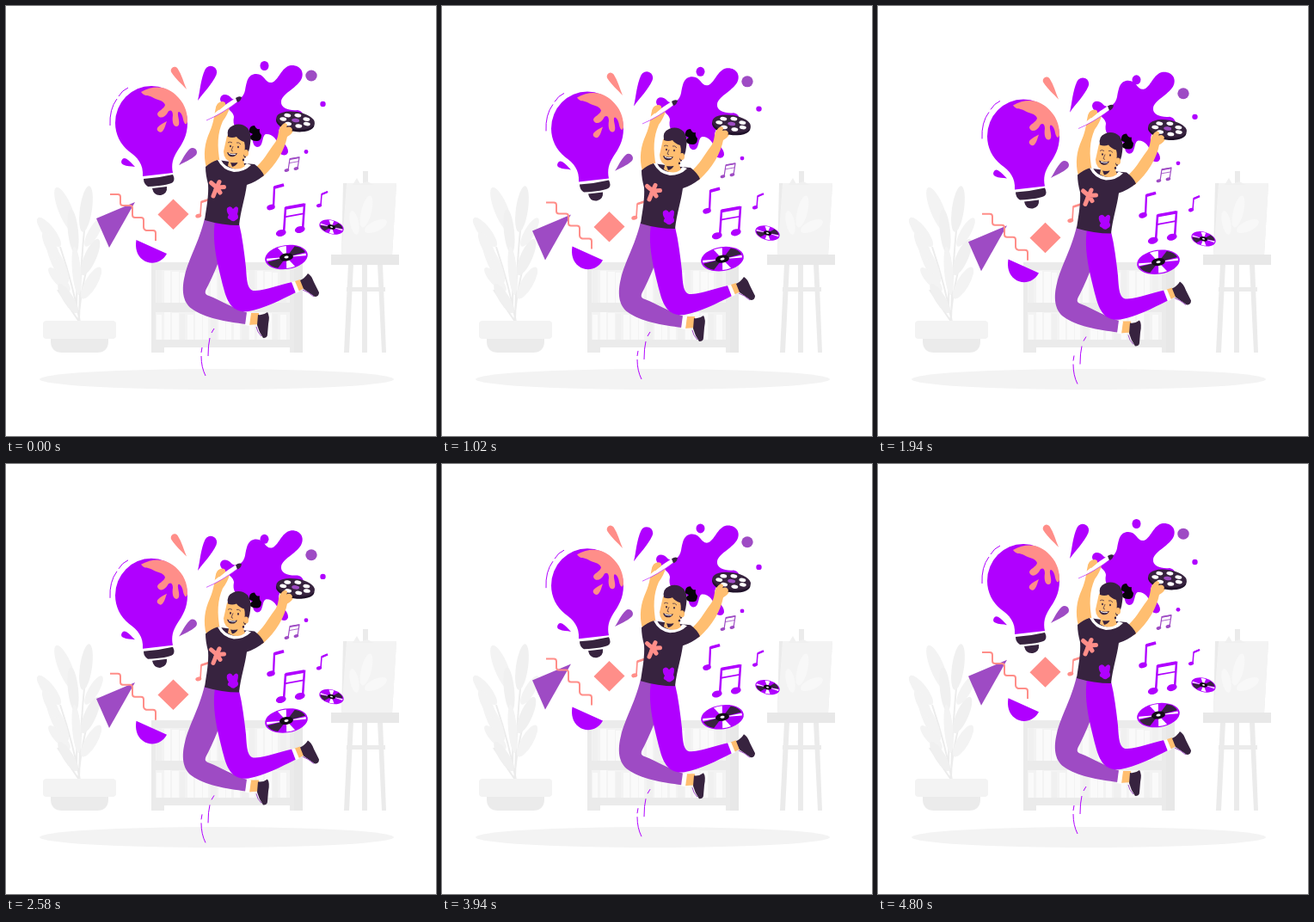
Write an HTML page with a canvas that moves like this. It is 500 by 500 pixels and loops after 4.84 s.

```html
<!DOCTYPE html>
<html lang="en">
<head>
<meta charset="utf-8">
<title>Creative leap</title>
<style>
html, body { margin: 0; width: 100%; height: 100%; overflow: hidden; background: #fff; }
canvas { display: block; width: 100vw; height: 100vh; }
</style>
</head>
<body>
<canvas id="stage" width="500" height="500"></canvas>
<script>
const ctx = document.getElementById('stage').getContext('2d');
const LOOP = 4840;
const PURPLE = '#b000ff', MUTED = '#9e4bc4', PINK = '#ff8e89', SKIN = '#ffbe70', DARK = '#37233f';
let theta = 0;

function fill(d, color) {
  ctx.fillStyle = color;
  ctx.fill(new Path2D(d));
}

function line(d, color, width = 1, cap = 'butt') {
  ctx.strokeStyle = color;
  ctx.lineWidth = width;
  ctx.lineCap = cap;
  ctx.stroke(new Path2D(d));
}

function oval(x, y, rx, ry, color, degrees = 0) {
  ctx.beginPath();
  ctx.ellipse(x, y, rx, ry, degrees * Math.PI / 180, 0, Math.PI * 2);
  ctx.fillStyle = color;
  ctx.fill();
}

function box(x, y, w, h, color, r = 0) {
  ctx.beginPath();
  ctx.roundRect(x, y, w, h, r);
  ctx.fillStyle = color;
  ctx.fill();
}

// Teardrop from a sharp tip to a round end centred on (x, y).
function drop(tipX, tipY, x, y, r, color) {
  const len = Math.hypot(x - tipX, y - tipY);
  ctx.save();
  ctx.translate(tipX, tipY);
  ctx.rotate(Math.atan2(y - tipY, x - tipX));
  ctx.beginPath();
  ctx.moveTo(0, 0);
  ctx.bezierCurveTo(len * .35, -r * .35, len * .65, -r, len, -r);
  ctx.arc(len, 0, r, -Math.PI / 2, Math.PI / 2);
  ctx.bezierCurveTo(len * .65, r, len * .35, r * .35, 0, 0);
  ctx.fillStyle = color;
  ctx.fill();
  ctx.restore();
}

// Draws a part sinking and rising by `travel`, ahead of the beat by `lead` radians.
function float(travel, lead, draw) {
  ctx.save();
  ctx.translate(0, travel / 2 * (Math.cos(lead) - Math.cos(theta + lead)));
  draw();
  ctx.restore();
}

function plant() {
  line('M86 367Q78 325 63 280M85 367Q86 310 92 250M84 367Q88 320 100 285M85 367Q70 345 60 330M82 350Q84 290 70 240', '#ececec', 2);
  const leaves = [
    [93, 236, 7, 27, 8], [69, 237, 8, 28, -22], [50, 263, 7, 21, -38], [78, 262, 6, 26, -6],
    [102, 263, 6, 19, 30], [60, 298, 7, 27, -25], [98, 292, 7, 23, 24], [62, 318, 6, 18, -42],
    [99, 322, 7, 21, 30], [72, 340, 6, 20, -32], [82, 308, 5, 28, -5], [52, 279, 6, 18, -28]
  ];
  leaves.forEach(([x, y, rx, ry, a], i) => oval(x, y, rx, ry, i % 3 ? '#f3f3f3' : '#f0f0f0', a));
  fill('M52 385H119V391Q118 403 106 403H65Q53 403 52 391Z', '#ebebeb');
  box(43, 366, 85, 21, '#f3f3f3', 4);
}

function bookshelf() {
  box(169, 298, 176, 105, '#ebebeb');
  box(335, 298, 10, 105, '#e8e8e8');
  [[307, 38], [356, 32]].forEach(([y, h], row) => {
    box(174, y, 156, h, '#f3f3f3');
    for (let i = 0; i < 17; i++) {
      const gap = (i * 5 + row * 3) % 4;
      box(175 + i * 9, y + gap, 6 + i % 3, h - gap, (i + row) % 4 ? '#fafafa' : '#f0f0f0');
    }
  });
  box(184, 397, 146, 6, '#fff');
}

function easel() {
  box(415, 192, 6, 15, '#ebebeb');
  fill('M398 300H404L399 403H393Z M432 300H438L442 403H437Z M414 300H420V403H414Z', '#ebebeb');
  box(396, 327, 45, 5, '#ebebeb');
  fill('M392 206H454L449 290H390Z', '#ebebeb');
  fill('M396 206H454L449 290H390Z', '#f3f3f3');
  fill('M403 208L408 200L412 207L420 204L428 208Z', '#f0f0f0');
  oval(419, 239, 6, 19, '#f8f8f8', 14);
  oval(405, 252, 5, 14, '#f8f8f8', -12);
  oval(430, 256, 14, 6, '#f8f8f8', -25);
  box(378, 289, 79, 12, '#e8e8e8');
}

function bulb() {
  fill('M159 198C160 184 153 176 143 169C133 161 127 149 127 136A42 43 0 0 1 211 136C211 151 205 160 199 169C194 177 192 184 194 194Z', PURPLE);
  fill('M157 100C173 91 187 94 197 103C207 112 211 122 211 134C210 140 207 137 206 132C205 125 201 121 200 124C199 128 204 138 199 140C194 141 193 133 194 127C194 121 190 120 188 124C185 130 178 132 176 126C176 122 184 120 185 115C183 109 176 110 170 106C166 103 161 106 157 100Z', PINK);
  drop(187, 134, 179.5, 143, 3.6, PINK);
  line('M142 95Q135 98 131 105M129 108Q120 120 121 139', PURPLE);
  fill('M160 201Q177 200 194 196Q197 202 194 205Q188 209 165 210Q160 207 160 201Z', DARK);
  fill('M170 212L187 210Q188 218 180 220Q172 221 170 212Z', DARK);
}

function splat() {
  fill('M331 69C342 68 348 77 343 86C337 96 321 102 320 111C319 119 330 122 339 121C348 123 348 133 340 133C327 132 317 137 317 148C318 157 329 162 328 170C326 176 317 174 317 166C317 155 309 148 302 149C297 151 300 164 292 164C284 162 290 150 279 148C267 145 263 139 265 129C265 121 249 116 249 108C250 101 258 102 262 107C267 112 276 108 278 98C280 88 281 79 291 79C301 79 301 90 309 89C317 87 320 71 331 69Z', PURPLE);
}

function disc(x, y, size, degrees) {
  const wedge = (from, to, color, r = 23) => {
    ctx.beginPath();
    ctx.moveTo(0, 0);
    ctx.arc(0, 0, r, from, to);
    ctx.fillStyle = color;
    ctx.fill();
  };
  ctx.save();
  ctx.translate(x, y);
  ctx.rotate(degrees * Math.PI / 180);
  ctx.scale(size, size * .56);
  oval(0, 0, 25, 25, PURPLE);
  [0, Math.PI].forEach(turn => {
    wedge(turn - 1.05, turn - .2, DARK);
    wedge(turn - 1.95, turn - 1.5, '#fff');
    wedge(turn - .1, turn + .12, '#fff');
  });
  oval(0, 0, 8, 8, '#130b17');
  oval(0, 0, 2.6, 2.6, '#fff');
  ctx.restore();
}

function note(x, y, w, h, color, weight) {
  line(`M${x - w} ${y + h}L${x - w + 1} ${y + 3}L${x} ${y}`, color, weight);
  line(`M${x - w + 1} ${y + 3}L${x} ${y}`, color, weight * 1.5);
  oval(x - w - weight * 1.3, y + h, weight * 2.1, weight * 1.4, color, -15);
}

function pairedNotes(x, y, w, h, color, weight) {
  const slope = w * .18;
  line(`M${x - 2} ${y + h}L${x} ${y}L${x + w} ${y - slope}L${x + w - 2} ${y + h - slope}`, color, weight);
  line(`M${x} ${y}L${x + w} ${y - slope}`, color, weight * 1.5);
  line(`M${x - 1} ${y + h * .36}L${x + w - 1} ${y + h * .36 - slope}`, color, weight * .7);
  [0, w].forEach(dx => oval(x + dx - 2 - weight * 1.3, y + h - dx * .18, weight * 2.4, weight * 1.55, color, -15));
}

function legs() {
  fill('M282 357L294 357L295 370L281 371Z', SKIN);
  fill('M293 359Q299 360 304 356Q307 360 305 370L304 382Q304 386 299 386Q294 379 292 371Z', DARK);
  line('M291 373Q292 379 297 384', MUTED);
  fill('M231 247L258 253C257 275 246 303 235 325C231 332 230 335 236 337C249 342 265 352 282 357L279 370C256 367 231 363 216 352C205 344 204 329 208 313C213 292 224 276 231 247Z', MUTED);
  fill('M280 356L285 357L283 372L278 371Z', '#fff');
  fill('M333 321L342 318L347 328L337 333Z', SKIN);
  fill('M342 319Q348 316 351 311Q355 313 358 321L364 333Q364 338 359 338L346 329Z', DARK);
  line('M345 330Q351 332 358 338', MUTED);
  fill('M243 250L271 253C275 269 277 287 279 304C280 321 281 332 290 331C304 330 318 324 333 321L337 333C319 342 300 352 282 355C266 357 258 348 253 328C247 304 239 276 243 250Z', PURPLE);
  fill('M332 321L336 320L341 332L337 334Z', '#fff');
}

function reel() {
  ctx.save();
  ctx.translate(336.5, 134);
  ctx.rotate(.15);
  oval(0, 1.5, 22.5, 10.5, '#20122a');
  oval(0, -1, 22.5, 10, DARK);
  for (let i = 0; i < 7; i++) {
    const a = i * Math.PI * 2 / 7 + .35;
    oval(14.5 * Math.cos(a), -1 + 6.2 * Math.sin(a), 4, 2.2, '#fff');
  }
  oval(0, -1, 4.5, 2.2, MUTED);
  ctx.restore();
}

function torso() {
  fill('M233 188C229 173 231 159 237 146C242 135 242 126 244 118Q246 111 252 112L260 118Q258 126 252 134C246 148 245 162 249 183Z', SKIN);
  fill('M289 189C299 181 305 169 312 160C317 154 316 148 318 143Q321 136 327 137L334 144Q334 148 327 152C324 167 315 184 298 199Z', SKIN);
  fill('M246 179L260 181L278 183L289 184Q297 190 300 197Q290 205 280 208C278 223 273 237 271 255Q251 255 231 249C233 235 236 220 235 207Q232 196 232 187Q239 181 246 179Z', DARK);
  fill('M246 179Q252 191 265 193Q277 193 285 185L280 183Q273 190 264 189Q254 187 250 179Z', '#fff');
  line('M238.5 205.5L245 211L241 221M248 204.5L245 211L253.5 210.5M245 211L249 217', PINK, 5, 'round');
  fill('M257 235Q261 231 264 236Q268 231 270 235Q270 239 269 242Q272 247 267 249Q264 252 260 248Q256 247 259 243Q256 239 257 235Z', PURPLE);
}

function head() {
  fill('M283 147Q282 139 289 139Q291 144 295 143Q294 147 297 150Q297 157 292 157Q284 157 283 152L287 149Z', '#07020a');
  fill('M260 176L277 170Q275 182 278 186Q269 193 258 186Z', SKIN);
  fill('M261 182Q266 183 270 181Q268 186 263 187Z', DARK);
  fill('M257 151Q270 145 281 154L282 168Q277 184 264 182Q253 180 253 169Z', SKIN);
  fill('M258 152Q256 142 264 139Q273 135 281 142Q286 149 284 160Q283 170 278 177L276 174Q279 165 277 158Q271 156 268 152Q263 154 258 152Z', DARK);
  oval(279, 171, 3, 4, SKIN);
  oval(276, 179, 1.2, 1.4, DARK);
  oval(261, 163, .9, 1.3, DARK);
  oval(270, 164, .9, 1.3, DARK);
  line('M258 159Q260 157 263 159M268 159Q271 158 273 161M264 163L262 168L264 169', DARK, .7);
  fill('M257 170Q263 173 269 171Q267 176 261 175Q258 174 257 170Z', DARK);
  line('M259 171.5Q263 173.5 267 172.5', '#fff');
}

function person() {
  legs();
  torso();
  head();
  reel();
  fill('M317 148Q318 139 324 136Q329 137 326 141Q332 139 333 144Q330 150 324 153Z', SKIN);
  fill('M233 133Q249 118 267 107L271 110Q257 122 233 133Z', '#fff');
  line('M233 133Q250 126 270 111', PURPLE, .6);
  fill('M267 107Q271 104 274 106Q273 111 269 112Z', DARK);
  fill('M244 118Q246 111 252 111Q257 112 254 116L248 121Z', SKIN);
}

function scene() {
  ctx.fillStyle = '#fff';
  ctx.fillRect(0, 0, 500, 500);
  plant();
  bookshelf();
  easel();
  oval(245, 434, 206, 12, '#f3f3f3');

  float(17, 0, bulb);
  float(12.5, .45, () => drop(210, 97, 196, 75, 4.3, PINK));
  float(14.5, .15, () => drop(223, 110, 238, 77, 7.2, PURPLE));
  float(18, -.35, () => drop(150, 187, 138, 181, 3.8, PURPLE));
  float(16, .1, () => drop(201, 185, 217, 170, 5, MUTED));

  float(8.5, 0, splat);
  float(18, 0, () => oval(300.5, 69.5, 5, 5.5, PURPLE));
  float(25, -.2, () => oval(355, 81, 6.7, 6.5, MUTED));
  float(17, -.1, () => oval(368.5, 114, 3.2, 3.2, PURPLE));
  float(14, .4, () => oval(349, 169.5, 2.4, 2.4, PURPLE));

  float(28.5, .3, () => fill('M150 228L105 247L120 281Z', MUTED));
  float(25, 0, () => line('M121 219H130Q133 219 133 222V229Q133 232 136 232H144Q147 232 147 235V243Q147 246 150 246H157Q160 246 160 249V257Q160 260 163 261H171Q174 261 174 264V273', PINK, 2));
  float(28.5, .3, () => fill('M194.5 224.5L212.5 242L194.5 260L176.5 242.5Z', PINK));
  float(27, -.2, () => fill('M151.5 272L187 288C181 299 168 302 159 295C152 290 150 281 151.5 272Z', PURPLE));

  float(6.5, -.1, () => disc(326, 292, 1, -8));
  float(14.5, .25, () => disc(378.5, 257, .58, 15));
  float(10, .1, () => note(323, 208, 12, 26, PURPLE, 2.3));
  float(10, -.1, () => pairedNotes(325, 235, 22, 29, PURPLE, 2.5));
  float(5.5, .1, () => note(374, 216, 8, 16, PURPLE, 1.5));
  float(13, .45, () => pairedNotes(330, 178, 11, 13, MUTED, 1.2));
  float(6, 0, () => note(236, 225, 10, 19, PINK, 1.7));

  float(10.5, 0, () => {
    line('M242 375L239 380M237 386Q235 394 235 407M228 397L227 403M227 407Q227 420 232 430', PURPLE);
    person();
  });
}

function frame(now) {
  theta = now % LOOP / LOOP * Math.PI * 2;
  scene();
  requestAnimationFrame(frame);
}
requestAnimationFrame(frame);
</script>
</body>
</html>
```
